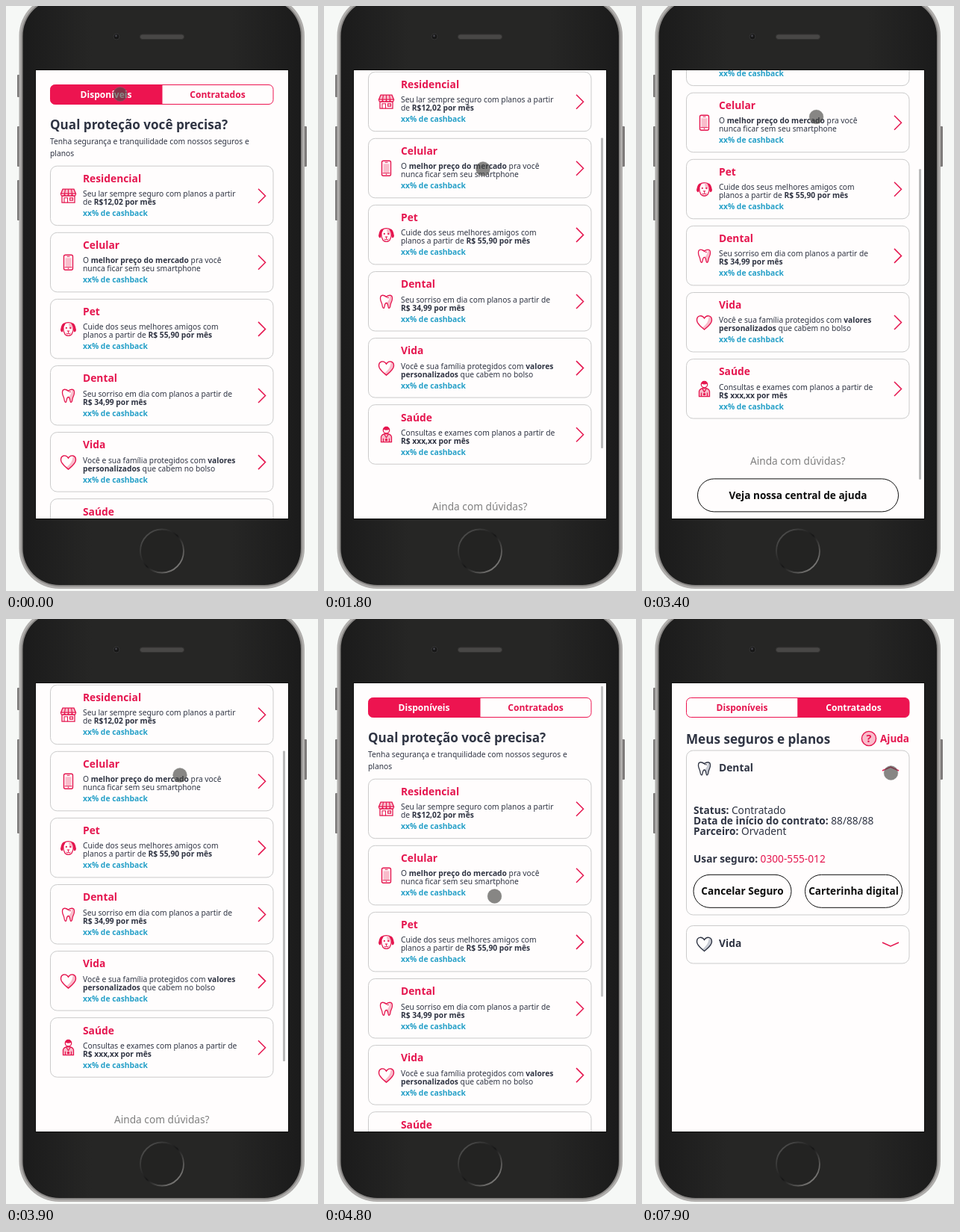
An HTML page with a canvas that plays this animation: 418x783 px, repeating every 8000 ms.

```html
<!DOCTYPE html>
<html lang="pt-BR">
<head>
<meta charset="utf-8">
<title>Seguros e planos</title>
<style>
html, body { margin: 0; width: 100%; height: 100%; overflow: hidden; background: #f6f8f6; }
canvas { display: block; width: 418px; height: 783px; }
</style>
</head>
<body>
<canvas id="stage"></canvas>
<script>
const W = 418, H = 783, LOOP = 8000, STEP = 100;
const RED = '#e5164f', TAB = '#ed1450', PINK = '#f9bccb', INK = '#2f3443',
  BLUE = '#26a0c8', PAPER = '#fffdfd', LINE = '#cbcbcb', BLACK = '#0c0c0c';
const FONT = '"Noto Sans", "Open Sans", sans-serif';
const SMALL = 10.25, MEDIUM = 13.7, LARGE = 17.1;

const canvas = document.getElementById('stage');
const ctx = canvas.getContext('2d');
const dpr = window.devicePixelRatio || 1;
canvas.width = W * dpr;
canvas.height = H * dpr;

const cards = [
  ['Residencial', 'Seu lar sempre seguro com planos a partir', 'de *R$12,02 por mês', shopIcon],
  ['Celular', 'O *melhor preço do mercado* pra você', 'nunca ficar sem seu smartphone', phoneIcon],
  ['Pet', 'Cuide dos seus melhores amigos com', 'planos a partir de *R$ 55,90 por mês', dogIcon],
  ['Dental', 'Seu sorriso em dia com planos a partir de', '*R$ 34,99 por mês', toothIcon],
  ['Vida', 'Você e sua família protegidos com *valores', '*personalizados* que cabem no bolso', heartIcon],
  ['Saúde', 'Consultas e exames com planos a partir de', '*R$ xxx,xx por mês', doctorIcon]
];

// Keyframes: time, then values
const scrollKeys = [[1200, 0], [1400, 34], [1800, 126], [2500, 217], [2800, 236],
  [3000, 236], [3900, 126], [4600, 0]];
const cursorKeys = [[200, 153, 118], [300, 148, 150], [400, 199.5, 187],
  [500, 199.5, 187], [600, 177, 225], [700, 199, 269.5],
  [800, 199, 269.5], [900, 210, 305], [1000, 226, 346],
  [1200, 226, 346], [1800, 213, 218], [2500, 230, 120], [2800, 234, 100],
  [3000, 234, 100], [3900, 233, 209], [4600, 228.5, 371],
  [4800, 228.5, 371], [5100, 268, 154], [5200, 268, 154], [5300, 344, 129.5],
  [5500, 344, 129.5], [5600, 271, 118.5], [6200, 271, 118.5], [7000, 301.5, 212.5],
  [7400, 301.5, 233.5], [7500, 301.5, 233.5], [7900, 333.5, 206]];
const barKeys = [[1200, 0], [1300, 1], [4700, 1], [4800, .85], [5100, 0]];

function track(keys, t) {
  if (t <= keys[0][0]) return keys[0].slice(1);
  for (let i = 1; i < keys.length; i++) {
    const a = keys[i - 1], b = keys[i];
    if (t <= b[0]) {
      const k = (t - a[0]) / (b[0] - a[0]);
      return a.slice(1).map((v, j) => v + (b[j + 1] - v) * k);
    }
  }
  return keys[keys.length - 1].slice(1);
}

function paint(fill, stroke, width = 1) {
  if (fill) { ctx.fillStyle = fill; ctx.fill(); }
  if (stroke) { ctx.strokeStyle = stroke; ctx.lineWidth = width; ctx.stroke(); }
}

function box(x, y, w, h, r, fill, stroke, width) {
  ctx.beginPath();
  ctx.roundRect(x, y, w, h, r);
  paint(fill, stroke, width);
}

function disc(x, y, r, fill, stroke, width) {
  ctx.beginPath();
  ctx.arc(x, y, r, 0, Math.PI * 2);
  paint(fill, stroke, width);
}

function poly(points, stroke, width) {
  ctx.beginPath();
  points.forEach(([x, y]) => ctx.lineTo(x, y));
  paint(null, stroke, width);
}

function shape(d, fill, stroke, width = 1.3) {
  const p = new Path2D(d);
  if (fill) { ctx.fillStyle = fill; ctx.fill(p); }
  if (stroke) { ctx.strokeStyle = stroke; ctx.lineWidth = width; ctx.stroke(p); }
}

function text(str, x, y, size, color, bold = true, align = 'left') {
  ctx.font = `${bold ? 700 : 400} ${size}px ${FONT}`;
  ctx.textAlign = align;
  ctx.fillStyle = color;
  ctx.fillText(str, x, y);
  return ctx.measureText(str).width;
}

// An asterisk toggles bold
function rich(str, x, y, size) {
  str.split('*').forEach((part, i) => {
    if (part) x += text(part, x, y, size, INK, i % 2 === 1);
  });
  return x;
}

function at(x, y, draw) {
  ctx.save();
  ctx.translate(x, y);
  draw();
  ctx.restore();
}

function shopIcon() {
  shape('M-8.5 0V9H8.5V0Z', null, RED);
  shape('M-7.5-9H7.5L10-3H-10Z', PINK, RED);
  shape('M-10-3a2.5 3 0 0 0 5 0a2.5 3 0 0 0 5 0a2.5 3 0 0 0 5 0a2.5 3 0 0 0 5 0M-4-9L-5-3M0-9V-3M4-9L5-3', null, RED, 1.1);
  shape('M-5.5 9V2.5H-1V9', null, RED, 1.1);
  shape('M2 2.5H6V6H2Z', PINK, RED, 1.1);
}

function phoneIcon() {
  box(-6, -10, 12, 20, 2, PAPER, RED, 1.4);
  shape('M-4-6H4V6H-4Z', PINK);
  shape('M-2-8H2M-5 6.5H5', null, RED, 1);
  disc(0, 8, .8, RED);
}

function dogIcon() {
  shape('M-4-8Q0-9.5 4-8L7-3Q7 3 4.5 7Q0 11-4.5 7Q-7 3-7-3Z', PAPER, RED);
  shape('M0-8.5Q5-8 6-3Q5 1 2 0Z', PINK);
  shape('M-4-8Q-9-9-10.5 1Q-10 4-8 4Q-6 1-6-3ZM4-8Q9-9 10.5 1Q10 4 8 4Q6 1 6-3Z', RED);
  disc(-2.7, -1.5, 1.1, RED);
  disc(2.7, -1.5, 1.1, RED);
  shape('M-2 2H2L0 4.3Z', RED);
  shape('M0 4V6M-3 5.5Q-1.5 7.5 0 6Q1.5 7.5 3 5.5', null, RED, 1);
}

function toothIcon(line = RED, tint = PINK) {
  const d = 'M0-6.5C3-8.5 8-10 8-4C8 0 6 1 5.5 5C5 8.5 4 9.5 3 8.5C2 7 2.5 2 0 2C-2.5 2-2 7-3 8.5C-4 9.5-5 8.5-5.5 5C-6 1-8 0-8-4C-8-10-3-8.5 0-6.5Z';
  shape(d, PAPER);
  shape('M7-6C8 0 6 1 5.5 5Q4 10 3 8Q3 2 0 2Q4-1 5-8Z', tint);
  shape(d, null, line);
  shape('M-2.5-7.5Q1-4.5 3.5-5', null, line, 1);
}

function heartIcon(line = RED, tint = PINK) {
  const d = 'M0-5.5C3-10.5 10-9.5 10-3C10 2 4 6 0 9.5C-4 6-10 2-10-3C-10-9.5-3-10.5 0-5.5Z';
  shape(d, PAPER);
  shape('M6-8C10-7 10.5-2 8 2L0 9.5L-3 7C3 3 6-2 6-8Z', tint);
  shape(d, null, line, 1.4);
}

function doctorIcon() {
  shape('M-7 10V3Q-6-1 0-1Q6-1 7 3V10Z', PINK, RED);
  disc(0, -6, 4.2, PAPER, RED, 1.3);
  shape('M-4-7Q0-5 4-7Q3-11 0-10.5Q-3-11-4-7Z', RED);
  shape('M-3-1L0 4L3-1M-4 10V5M4 10V5', null, RED, 1.2);
  disc(0, 7, 1.7, RED);
}

function tabs(active) {
  const left = [6, 0, 0, 6], right = [0, 6, 6, 0];
  box(59.5, 105.5, 149.5, 26, left, active ? PAPER : TAB, TAB);
  box(209, 105.5, 149, 26, right, active ? TAB : PAPER, TAB);
  text('Disponíveis', 134, 122.7, 12.05, active ? RED : '#fff', true, 'center');
  text('Contratados', 283.5, 122.7, 12.05, active ? '#fff' : RED, true, 'center');
}

function pill(label, x, y, w) {
  box(x, y, w, 44, 22, null, BLACK, 1);
  text(label, x + w / 2, y + 27, 13.6, BLACK, true, 'center');
}

function productCard([title, first, second, icon], y) {
  box(59.5, y, 298.5, 79.5, 9, null, LINE);
  at(83.5, y + 40, () => icon());
  text(title, 103, y + 21.8, 13.8, RED);
  rich(first, 103, y + 41, SMALL);
  rich(second, 103, y + 52, SMALL);
  text('xx% de cashback', 103, y + 67, 10.3, BLUE);
  poly([[338, y + 30.5], [347.5, y + 40], [338, y + 49.5]], RED, 1.5);
}

function availablePage(scroll) {
  at(0, -scroll, () => {
    tabs(0);
    text('Qual proteção você precisa?', 59, 165, LARGE, INK);
    text('Tenha segurança e tranquilidade com nossos seguros e', 59, 185.3, SMALL, INK, false);
    text('planos', 59, 201, SMALL, INK, false);
    cards.forEach((card, i) => productCard(card, 214.2 + i * 89.1));
    text('Ainda com dúvidas?', 208.7, 801, MEDIUM, '#808080', false, 'center');
    pill('Veja nossa central de ajuda', 74.5, 820, 269);
  });
}

function hiredPage() {
  const tint = '#c9ccd4';
  tabs(1);
  text('Meus seguros e planos', 59, 166.5, LARGE, INK);
  disc(304, 160, 9.6, PINK, RED, 1.4);
  text('?', 304, 165.3, 14.5, RED, true, 'center');
  text('Ajuda', 319, 165, 13.5, RED);

  box(59.5, 176, 298.5, 220, 9, null, LINE);
  at(83.5, 200, () => toothIcon(INK, tint));
  text('Dental', 103, 204, 13.8, INK);
  poly([[322, 203], [333, 198], [344, 203]], RED, 1.5);
  rich('*Status:* Contratado', 69, 261, MEDIUM);
  rich('*Data de início do contrato:* 88/88/88', 69, 275, MEDIUM);
  rich('*Parceiro:* Orvadent', 69, 289, MEDIUM);
  const x = rich('*Usar seguro:* ', 69, 326, MEDIUM);
  text('0300-555-012', x, 326, MEDIUM, RED, false);
  pill('Cancelar Seguro', 69, 342.3, 131);
  pill('Carterinha digital', 218.5, 342.3, 130);

  box(59.5, 410.5, 298.5, 50.5, 9, null, LINE);
  at(83.5, 435, () => heartIcon(INK, tint));
  text('Vida', 103, 439, 13.8, INK);
  poly([[322, 433], [333, 438], [344, 433]], RED, 1.5);
}

function gradient(x0, y0, x1, y1, ...colors) {
  const g = ctx.createLinearGradient(x0, y0, x1, y1);
  colors.forEach((c, i) => g.addColorStop(i / (colors.length - 1), c));
  return g;
}

function phone() {
  ctx.fillStyle = '#f6f8f6';
  ctx.fillRect(0, 0, W, H);
  [[15, 92, 30], [15, 161, 54], [15, 233, 54], [399, 161, 54]].forEach(([x, y, h]) =>
    box(x, y, 4, h, 1, '#7d7b7a'));
  box(17.5, -14, 382.5, 794, 54, '#b0aeac');
  box(20.5, -11, 376.5, 788, 51, '#8a8886');
  box(22.5, -9, 372.5, 784, 49, gradient(22, 0, 395, 0, '#1b1b1b', '#262625', '#262625', '#262625', '#1b1b1b'));
  box(179.5, 38, 59, 6.5, 3.2, '#484746', '#343332');
  disc(148, 41, 4, '#171717', '#323232');
  disc(147.5, 40, 1.4, '#45454c');
  disc(209, 729.5, 29, '#232322', gradient(188, 709, 230, 750, '#4a4a49', '#171717', '#777674'), 1.8);
  ctx.fillStyle = '#0d0d0d';
  ctx.fillRect(39, 85, 340, 602);
  ctx.fillStyle = PAPER;
  ctx.fillRect(40, 86, 338, 600);
}

function draw(t) {
  ctx.setTransform(dpr, 0, 0, dpr, 0, 0);
  phone();
  ctx.save();
  ctx.beginPath();
  ctx.rect(40, 86, 338, 600);
  ctx.clip();
  if (t < 5800) {
    const [scroll] = track(scrollKeys, t);
    const [alpha] = track(barKeys, t);
    availablePage(scroll);
    ctx.globalAlpha = alpha;
    box(371, 90 + scroll * .686, 3, 415.5, 1, '#b9b9b9');
    ctx.globalAlpha = 1;
  } else {
    hiredPage();
  }
  const [x, y] = track(cursorKeys, t);
  disc(x, y, 9.4, 'rgba(70,70,68,.65)', 'rgba(130,130,128,.5)', .8);
  ctx.restore();
}

const start = performance.now();
function frame() {
  const t = (performance.now() - start) % LOOP;
  draw(Math.floor(t / STEP) * STEP);
  requestAnimationFrame(frame);
}
frame();
</script>
</body>
</html>
```
